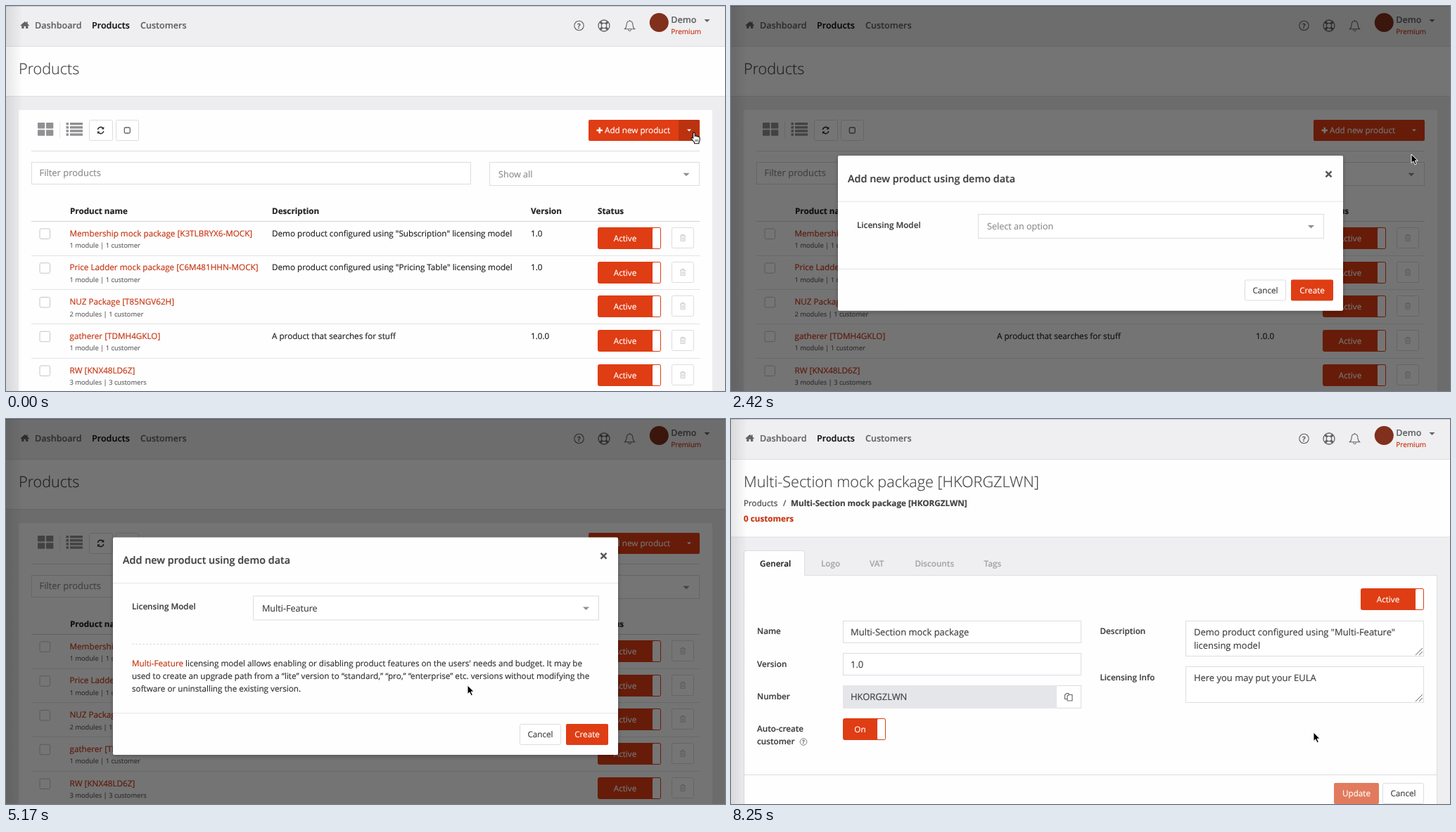
Animation of 1022 by 548 pixels, one loop 8330 ms. Source, as an HTML page:

```html
<!DOCTYPE html>
<html lang="en">
<head>
<meta charset="utf-8">
<title>Product admin</title>
<style>
html, body { margin: 0; width: 100%; height: 100%; overflow: hidden; background: #fff; }
svg { display: block; width: 100vw; height: 100vh; }
text { font-family: "Open Sans", sans-serif; white-space: pre; text-rendering: geometricPrecision; stroke-width: .18px; }
</style>
</head>
<body>
<svg id="stage" viewBox="0 0 1022 548"></svg>
<script>
const LOOP = 8330, STEP = 83.3;
const RED = '#df3d14', LINK = '#c63512', INK = '#414143', GREY = '#626366', PALE = '#8c8d90', LINE = '#dcdde0';

// Drawing helpers, each returning SVG markup
const text = (x, y, str, size = 11.7, fill = INK, weight = 400, anchor = 'start') =>
  `<text x="${x}" y="${y}" font-size="${size}" fill="${fill}" stroke="${fill}" font-weight="${weight}" text-anchor="${anchor}">${str}</text>`;
const rect = (x, y, w, h, fill, stroke = 'none', r = 0, more = '') =>
  `<rect x="${x}" y="${y}" width="${w}" height="${h}" rx="${r}" fill="${fill}" stroke="${stroke}" ${more}/>`;
const box = (x, y, w, h, r = 0, fill = '#fff') => rect(x + .5, y + .5, w - 1, h - 1, fill, LINE, r);
const path = (d, stroke, width = 1, fill = 'none', more = '') =>
  `<path d="${d}" stroke="${stroke}" stroke-width="${width}" fill="${fill}" ${more}/>`;
const hline = (x1, x2, y, color = LINE) => path(`M${x1} ${y}H${x2}`, color);
const circle = (x, y, r, fill, stroke = 'none', width = 1) =>
  `<circle cx="${x}" cy="${y}" r="${r}" fill="${fill}" stroke="${stroke}" stroke-width="${width}"/>`;
const caret = (x, y, w, fill, up = 1) => path(`M${x - w} ${y - up * w / 2}h${2 * w}l${-w} ${up * w}z`, 'none', 0, fill);
const group = (id, body, more = '') => `<g id="${id}" ${more}>${body}</g>`;

const toggle = (x, y, w, label) =>
  rect(x + .5, y + .5, w - 1, 30, RED, RED, 2) + rect(x + w - 12, y + 1, 11, 29, '#fff', 'none', 1.5) +
  text(x + (w - 12) / 2, y + 19.5, label, 11.7, '#fff', 400, 'middle');
const button = (x, y, w, label, fill) =>
  (fill ? rect(x, y, w, 30, fill, 'none', 2) : box(x, y, w, 30, 2)) +
  text(x + w / 2, y + 19, label, 11.7, fill ? '#fff' : INK, 400, 'middle');
const help = (x, y, r) => circle(x, y, r, 'none', GREY, r / 6) +
  text(x, y + r * .55, '?', r * 1.5, GREY, 700, 'middle');

function trash(x, y) {
  return path(`M${x - 4} ${y - 3}h8M${x - 1.5} ${y - 3}v-1.5h3v1.5M${x - 3} ${y - 3}v7.5h6v-7.5M${x - 1} ${y - 1}v4M${x + 1} ${y - 1}v4`, '#c9cacc');
}

function header() {
  let spokes = '';
  for (let a = 45; a < 360; a += 90) spokes += path('M3.6 0H8', GREY, 3.2, 'none', `transform="translate(850 28) rotate(${a})"`);
  return rect(0, 0, 1022, 57, '#efeff1') + hline(0, 1022, .5, '#c9c9cb') + hline(0, 1022, 57.5, '#e0e0e2') +
    path('M20.5 27.5l6.3-5.5 2.2 1.9v-1.5h1.7v3l2.4 2.1-.8.9-1-.8v4.4h-3.2v-3.2h-2.6v3.2h-3.2v-4.4l-1 .8z', 'none', 0, GREY) +
    text(41, 31.5, 'Dashboard', 12.6, GREY, 600) + text(122, 31.5, 'Products', 12.6, '#111', 600) +
    text(191, 31.5, 'Customers', 12.6, GREY, 600) + help(814.5, 28, 6.7) +
    circle(850, 28, 8, 'none', GREY, 1.3) + circle(850, 28, 3.7, 'none', GREY, 1.3) + spokes +
    path('M879.5 32.8c2.5-2 2.4-4 2.6-6.5.2-3 2-4.8 4.4-4.8s4.2 1.8 4.4 4.8c.2 2.5.1 4.5 2.6 6.5zM886.5 21.5v-1.5M884.5 33.5q.2 2 2 2t2-2', GREY, 1.1) +
    circle(928.3, 23.5, 13.5, '#80301c') +
    text(945.3, 24, 'Demo', 12.6, GREY, 600) + text(945.3, 40, 'Premium', 10, LINK) + caret(996.5, 21, 4, GREY);
}

const edgeShade = rect(0, 0, 24, 548, 'url(#edge)');

const products = [
  ['Membership mock package [K3TLBRYX6-MOCK]', '1 module | 1 customer', 'Demo product configured using "Subscription" licensing model', '1.0'],
  ['Price Ladder mock package [C6M481HHN-MOCK]', '1 module | 1 customer', 'Demo product configured using "Pricing Table" licensing model', '1.0'],
  ['NUZ Package [T85NGV62H]', '2 modules | 1 customer', '', ''],
  ['gatherer [TDMH4GKLO]', '1 module | 1 customer', 'A product that searches for stuff', '1.0.0'],
  ['RW [KNX48LD6Z]', '3 modules | 3 customers', '', '']
];

function productRow([name, info, about, version], i) {
  const y = 306.8 + i * 48.75, top = Math.round(y + 8);
  return hline(36, 986, Math.round(y) - .5, i ? '#e2e3e5' : '#d2d3d5') +
    rect(48, y + 10.2, 14.5, 14.5, '#fff', '#c4c5c9', 2) +
    text(90.5, y + 20.7, name, 11.7, LINK) + text(90.5, y + 37.4, info, 9.36, GREY) +
    text(378, y + 20.7, about, 11.7, '#222') + text(746, y + 20.7, version, 11.7, '#222') +
    toggle(841, top, 90, 'Active') + box(946, top, 32, 30, 2) + trash(962, top + 15);
}

function listPage() {
  let icons = '';
  for (let i = 0; i < 4; i++) {
    icons += rect(45 + (i % 2) * 12, 166 + (i >> 1) * 10.3, 10.3, 8.5, '#909194', 'none', 1) +
      rect(85.5, 166 + i * 5.1, 3.5, 3.4, '#909194') + rect(91, 166 + i * 5.1, 18, 3.4, '#909194');
  }
  return rect(0, 57, 1022, 491, '#ededef') + rect(0, 58, 1022, 70, '#fefefe') + hline(0, 1022, 128.5, '#dedee1') +
    text(18, 97, 'Products', 21.6, INK, 300) + rect(18, 148, 986, 400, '#fefefe') +
    icons + path('M76.5 165v23', '#e8e8ea') + box(118, 162, 34, 30, 2) + box(156, 162, 33, 30, 2) +
    path('M130.5 176a4.2 4.2 0 0 1 7.6-1.8M138.7 178a4.2 4.2 0 0 1-7.6 1.8', '#333', 1.5) +
    path('M139.3 171.8v3.7h-3.7zM129.9 182.2v-3.7h3.7z', 'none', 0, '#333') +
    rect(168.3, 173, 8, 8, 'none', GREY, 1.5, 'stroke-width="1.3"') +
    rect(828, 162, 158, 30, RED, 'none', 2) + rect(956, 162, 30, 30, '#bb3210', 'none', 2, 'id="caretHover"') +
    path('M839.5 177h8.4M843.7 172.8v8.4', '#fff', 2.4) + text(851, 181, 'Add new product', 11.7, '#fff') + caret(971, 177, 3, '#fff') +
    hline(36, 986, 206.5) + box(36, 222, 625, 32) + text(47.5, 242.3, 'Filter products', 12.96, PALE) +
    box(687, 222, 299, 34) + text(700, 244, 'Show all', 12.6, PALE) + caret(967, 240, 4.6, '#8f9093') +
    [[91, 'Product name'], [378, 'Description'], [746, 'Version'], [841, 'Status']]
      .map(([x, label]) => text(x, 295.5, label, 11.7, '#222', 700)).join('') +
    products.map(productRow).join('');
}

function detailPage() {
  const name = 'Multi-Section mock package', code = 'HKORGZLWN', full = `${name} [${code}]`;
  const label = (x, y, str) => text(x, y, str, 11.7, INK, 600);
  const value = (x, y, str) => text(x, y, str, 12.96, INK);
  const grip = (x, y) => path(`M${x - 10} ${y}l10-10M${x - 5} ${y}l5-5`, '#666');
  return rect(0, 57, 1022, 491, '#efeff1') + rect(0, 58, 1022, 110, '#fefefe') + hline(0, 1022, 168, '#dedee1') +
    text(18, 97, full, 21.6, INK, 300) + text(18, 123.5, 'Products', 11.7, INK) + text(74, 123.5, '/', 11.7, INK) +
    text(85, 123.5, full, 11.7, INK, 700) + text(18, 145.5, '0 customers', 11.7, LINK, 700) +
    rect(18.5, 222.5, 985, 340, '#fefefe', LINE) +
    path('M18.5 224V190q0-2.5 2.5-2.5h81q2.5 0 2.5 2.5V222.5', LINE, 1, '#fefefe') + rect(19, 221, 85, 4, '#fefefe') +
    text(41, 210, 'General', 11.7, '#222', 600) +
    [[128, 'Logo'], [197, 'VAT'], [261.5, 'Discounts'], [359.5, 'Tags']]
      .map(([x, tab]) => text(x, 210, tab, 11.7, '#a6a7aa', 600)).join('') +
    toggle(895, 241, 90, 'Active') +
    label(37, 306, 'Name') + box(159, 287, 339, 32) + value(170, 307.5, name) +
    label(37, 352.5, 'Version') + box(159, 333, 339, 32) + value(170, 353.5, '1.0') +
    label(37, 399, 'Number') + box(159, 379, 339, 33) + rect(159, 379, 304, 33, '#e5e6e9') + value(170, 400, code) +
    path('M478 398.5h-3.5v-5.5l2.5-2.5h3v2M478 394.5l2-2h5v8.5h-7z', GREY, 1.1) +
    label(37, 445, 'Auto-create') + label(37, 463, 'customer') + help(103, 459.5, 4.8) + toggle(159, 426, 61, 'On') +
    label(524.5, 306, 'Description') + box(646, 287, 339, 51) +
    value(658, 307.5, 'Demo product configured using "Multi-Feature"') + value(658, 327, 'licensing model') + grip(983, 336) +
    label(524.5, 372, 'Licensing Info') + box(646, 352, 339, 52) + value(658, 373, 'Here you may put your EULA') + grip(983, 402) +
    hline(18, 1003, 506.5) + button(857, 518, 64, 'Update', '#e27b5d') + button(926, 518, 59, 'Cancel');
}

function modal() {
  let spinner = '';
  for (let i = 0; i < 12; i++) spinner += path('M0-5V-9.5', '#fff', 1.4, 'none', `transform="rotate(${i * 30})" opacity="${.25 + i / 16}"`);
  const about = [`<tspan fill="${LINK}" stroke="${LINK}">Multi-Feature</tspan> licensing model allows enabling or disabling product features on the users' needs and budget. It may be`,
    'used to create an upgrade path from a “lite” version to “standard,” “pro,” “enterprise” etc. versions without modifying the',
    'software or uninstalling the existing version.'];
  return rect(152, 0, 718, 220, '#fefefe', 'none', 2, 'id="sheet" filter="url(#drop)"') +
    text(166, 37.5, 'Add new product using demo data', 14.4, INK, 600) +
    path('M845.5 22.3l8 8M853.5 22.3l-8 8', '#555', 2.4) + hline(152, 870, 65.2, '#e4e4e6') +
    text(179, 102.5, 'Licensing Model', 11.7, INK, 600) + box(351, 83, 492, 35) +
    text(364, 105.2, 'Select an option', 12.6, PALE).replace('<text', '<text id="choice"') +
    group('caretDown', caret(824.5, 101.2, 4.6, '#8f9093')) + group('caretUp', caret(824.5, 101.2, 4.6, '#8f9093', -1)) +
    group('about', path('M179 152H843', '#dcdcde', 1, 'none', 'stroke-dasharray="3 2"') +
      about.map((line, i) => text(179, 183.9 + i * 17.55, line, 11.7, '#333')).join('')) +
    group('footer', hline(152, 870, -59.3, '#e4e4e6') +
      group('idle', button(730, -44.2, 59, 'Cancel') + button(796, -44.2, 60, 'Create', RED)) +
      group('busy', button(690, -44.2, 59, 'Cancel') + rect(757, -44.2, 99, 30, '#e27b5d', 'none', 2) +
        text(826, -25.2, 'Create', 11.7, '#fff', 400, 'middle') +
        `<g transform="translate(781.5 -29)">${group('spinner', spinner)}</g>`)) +
    group('list', rect(351.5, 117.5, 491, 240, '#fefefe', LINE) +
      group('mark', rect(352, 0, 491, 36, RED) + text(832, 22, 'Press Enter to select', 11.7, '#fff', 400, 'end')) +
      ['Floating', 'Multi-Feature', 'Node-Locked', 'Pay-per-Use', 'Pricing Table', 'Quota']
        .map((option, i) => text(363.3, 140.2 + i * 36, option, 12.6).replace('<text', '<text class="option"')).join(''));
}

const menu = rect(805, 193, 219, 35, '#fefefe', '#d5d5d7', 2, 'filter="url(#drop)"') +
  rect(811, 197, 207, 28, '#efefee', 'none', 0, 'id="menuHover"') + text(826, 215, 'Add new product using demo data', 10.8, '#222');

const arrow = path('M0 0V12.6L2.9 9.9 5.1 14.8 7.3 13.8 5.2 9.1H9.2Z', '#fff', 1, '#000');
const hand = path('M-1.4 1q1.4-1.8 2.6 0v4.2q1.6-1 2.5.4 1.7-.7 2.4.7 2-.3 2 1.5v3.2q0 1.6-1.2 3v1.8h-6.3v-1.5q-2.3-2.4-4.4-5.5-.4-1.8 1.4-1.6l1 1.1z', '#111', 1.1, '#fff') +
  path('M1.8 10v3M3.6 10v3M5.4 10v3', '#111', .7);

const stage = document.getElementById('stage');
stage.innerHTML = `<defs>
  <linearGradient id="edge"><stop stop-color="#000" stop-opacity=".09"/><stop offset="1" stop-color="#000" stop-opacity="0"/></linearGradient>
  <linearGradient id="glow"><stop stop-color="#f1bba9"/><stop offset="1" stop-color="#eda58e"/></linearGradient>
  <filter id="drop" x="-10%" y="-20%" width="120%" height="150%"><feDropShadow dx="0" dy="2" stdDeviation="3" flood-opacity=".25"/></filter>
  </defs>` +
  group('listPage', listPage()) + group('detailPage', detailPage()) + header() + edgeShade + group('menu', menu) +
  rect(0, 0, 1022, 548, '#000', 'none', 0, 'id="backdrop"') + group('modal', modal()) +
  path('M1018.5 0V428q0 5 3.5 5', '#c4c4c6', 1, '#fafafa', 'id="panelEdge"') + rect(0, 0, 0, 1.5, 'url(#glow)', 'none', 0, 'id="progress"') +
  group('cursor', group('arrow', arrow) + group('hand', hand));

const el = {};
stage.querySelectorAll('[id]').forEach(node => el[node.id] = node);
const options = stage.querySelectorAll('.option');

// [ms, x, y] stops of the pointer
const pointer = [[0, 978, 180], [450, 978, 180], [750, 967, 211], [2550, 967, 211], [3100, 656, 308], [3550, 656, 308],
  [3950, 656, 379], [5200, 656, 379], [5980, 828, 446], [LOOP, 828, 446]];
const handTimes = [[0, 560], [2900, 4580], [5900, 6240]];
const progressStops = [[6660, 0], [6750, 78], [7000, 210], [7400, 420], [7580, 1022], [LOOP, 1022]];

const within = (t, from, to) => t >= from && t < to;
const ramp = (t, from, to) => Math.min(1, Math.max(0, (t - from) / (to - from)));
const ease = p => p * p * (3 - 2 * p);
const show = (id, on) => el[id].style.display = on ? '' : 'none';
const place = (id, x, y) => el[id].setAttribute('transform', `translate(${x} ${y})`);

function paint(node, color) {
  node.setAttribute('fill', color);
  node.setAttribute('stroke', color);
}

function along(stops, t) {
  const i = Math.max(1, stops.findIndex(stop => stop[0] > t));
  const a = stops[i - 1], b = stops[i], p = ease(ramp(t, a[0], b[0]));
  return a.slice(1).map((v, k) => v + (b[k + 1] - v) * p);
}

function render(t) {
  const detail = t >= 7400;
  show('listPage', !detail);
  show('detailPage', detail);
  show('caretHover', t < 1950);
  show('menu', within(t, 400, 1950));
  show('menuHover', t >= 650);

  const fade = ramp(t, 1960, 2250) * (1 - ramp(t, 6560, 6700));
  show('backdrop', fade > 0);
  show('modal', fade > 0);
  el.backdrop.setAttribute('opacity', fade * .54);
  el.modal.setAttribute('opacity', fade);

  const chosen = t >= 4560, open = within(t, 3330, 4560), busy = t >= 6240;
  const height = chosen ? 309.6 : 220.7;
  place('modal', 0, (chosen ? 168.5 : 213) - 30 * (1 - ease(ramp(t, 1960, 2250))));
  el.sheet.setAttribute('height', height);
  place('footer', 0, height);
  el.choice.textContent = chosen ? 'Multi-Feature' : 'Select an option';
  paint(el.choice, chosen ? INK : PALE);
  show('about', chosen);
  show('list', open);
  show('caretUp', open);
  show('caretDown', !open);
  show('idle', !busy);
  show('busy', busy);
  el.spinner.setAttribute('transform', `rotate(${Math.floor(t / STEP) * 30})`);

  const marked = t >= 3780 ? 1 : 0;
  place('mark', 0, 118 + marked * 36);
  options.forEach((node, i) => paint(node, i === marked ? '#fff' : INK));

  show('panelEdge', within(t, 6700, 7150));
  el.progress.setAttribute('width', along(progressStops, t)[0]);
  el.progress.setAttribute('opacity', 1 - ramp(t, 7580, 7800));

  const pointing = handTimes.some(([from, to]) => within(t, from, to));
  place('cursor', ...along(pointer, t));
  show('hand', pointing);
  show('arrow', !pointing);
}

const start = performance.now();
function tick() {
  const t = (performance.now() - start) % LOOP;
  render(Math.floor((t + 4) / STEP) * STEP % LOOP);
  requestAnimationFrame(tick);
}
tick();
</script>
</body>
</html>
```
